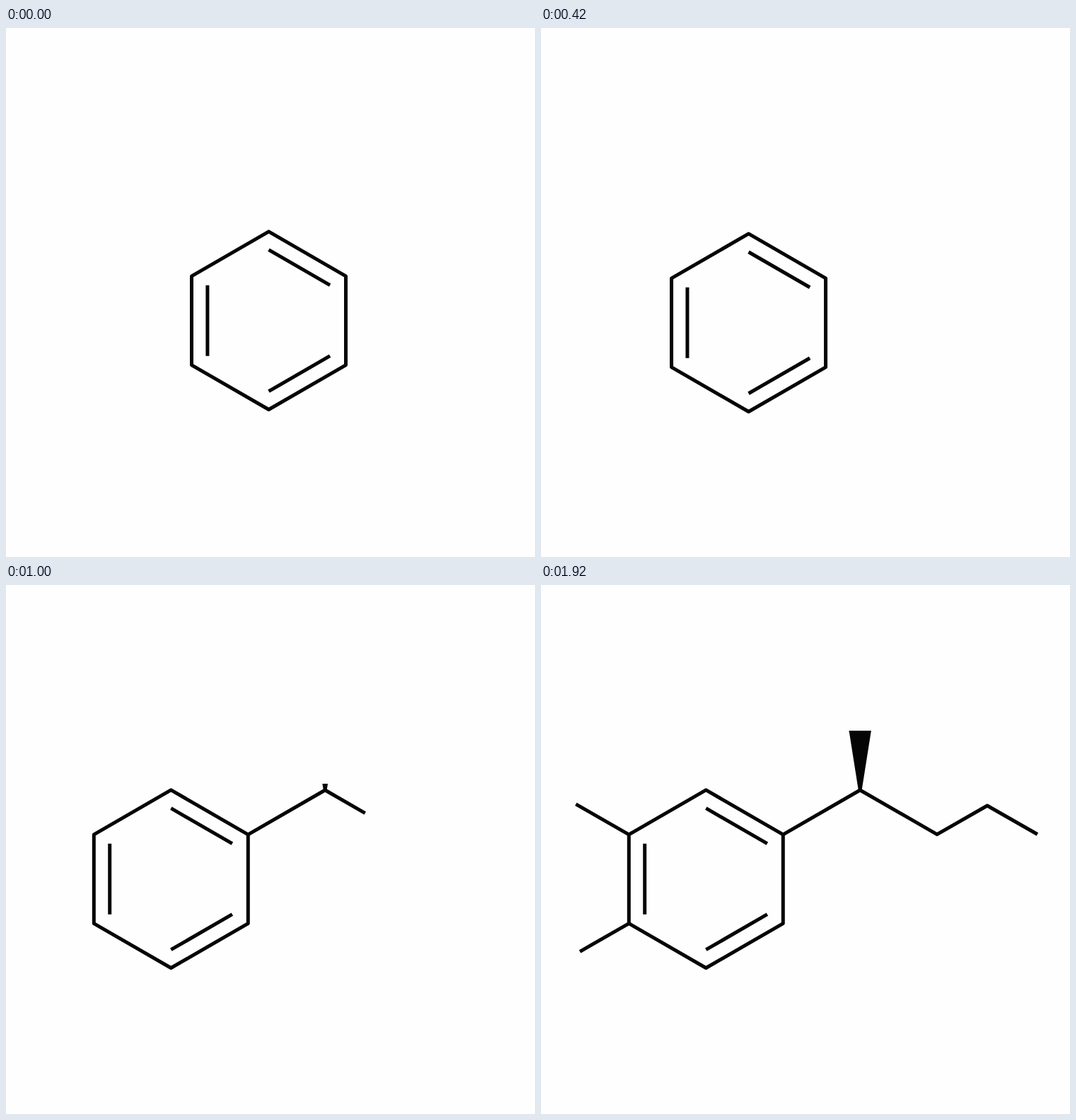
Animation of 748x748 px, one loop 1.94 s. Source, as an HTML page:

```html
<!DOCTYPE html>
<html lang="en">
<head>
<meta charset="utf-8">
<title>Molecule drawing</title>
<style>
  html, body { margin: 0; width: 100%; height: 100%; overflow: hidden; background: #fefefe; }
  svg { display: block; width: 748px; height: 748px; }
  path { fill: none; stroke: #050506; stroke-width: 5; stroke-linejoin: round; }
  #wedge { fill: #050506; stroke: none; }
</style>
</head>
<body>
<svg viewBox="0 0 748 748">
  <g id="ring">
    <path d="M0-125.8 109-62.9V62.9L0 125.8-109 62.9V-62.9Z"/>
    <path d="M0-100 86.6-50M86.6 50 0 100M-86.6 50V-50"/>
  </g>
  <path id="chain" d="M342.3 352.8 451.2 290 560 352.7 631 312 702 352.5"/>
  <path id="upper" pathLength="1" d="M124.3 352.8 49.3 309.8"/>
  <path id="lower" pathLength="1" d="M124.3 478.6 55 518.3"/>
  <path id="wedge"/>
</svg>
<script>
const LOOP = 1940, STEP = 20;
const el = id => document.getElementById(id);

// Keys are [time, value, slope per ms], joined by cubic Hermite curves.
const ringX = [[232, 371.5, -.45], [340, 325.3, -.41], [500, 267, -.28], [680, 233.3, 0]];
const ringY = [[232, 413.7, .02], [340, 415.7, .016], [500, 417.1, 0], [680, 415.7, 0]];
const chainLength = [[708, 0, 1], [1000, 191, .4], [1320, 295, .3], [1840, 407, .11], [1920, 414.8, .08]];

function curve(keys, t) {
  if (t <= keys[0][0]) return keys[0][1];
  const i = keys.findIndex(k => k[0] > t);
  if (i < 0) return keys[keys.length - 1][1];
  const [t0, a, m] = keys[i - 1], [t1, b, n] = keys[i];
  const d = t1 - t0, u = (t - t0) / d, v = 1 - u;
  return v * v * (a * (1 + 2 * u) + m * d * u) + u * u * (b * (1 + 2 * v) - n * d * v);
}

function reveal(id, length) {
  el(id).style.display = length > 0 ? "" : "none";
  el(id).setAttribute("stroke-dasharray", `${length} 1000`);
}

function wedgePath(t) {
  const s = Math.max(0, t - 920);
  const h = .1145 * s - .0000305 * s * s;
  if (!h) return "";
  const half = 2.4 + .158 * h, top = 290 - h;
  return `M448.8 290 ${451.2 - half} ${top}H${451.2 + half}L453.6 290Z`;
}

function draw(t) {
  el("ring").setAttribute("transform", `translate(${curve(ringX, t)} ${curve(ringY, t)})`);
  reveal("chain", curve(chainLength, t));
  const u = Math.min(1, Math.max(0, (t - 1300) / 620));
  const branch = 1 - (1 - u) ** 1.4;
  reveal("upper", branch);
  reveal("lower", branch);
  el("wedge").setAttribute("d", wedgePath(t));
}

const start = performance.now();
function tick() {
  const t = (performance.now() - start) % LOOP;
  draw(Math.floor(t / STEP) * STEP);
  requestAnimationFrame(tick);
}
tick();
</script>
</body>
</html>
```
